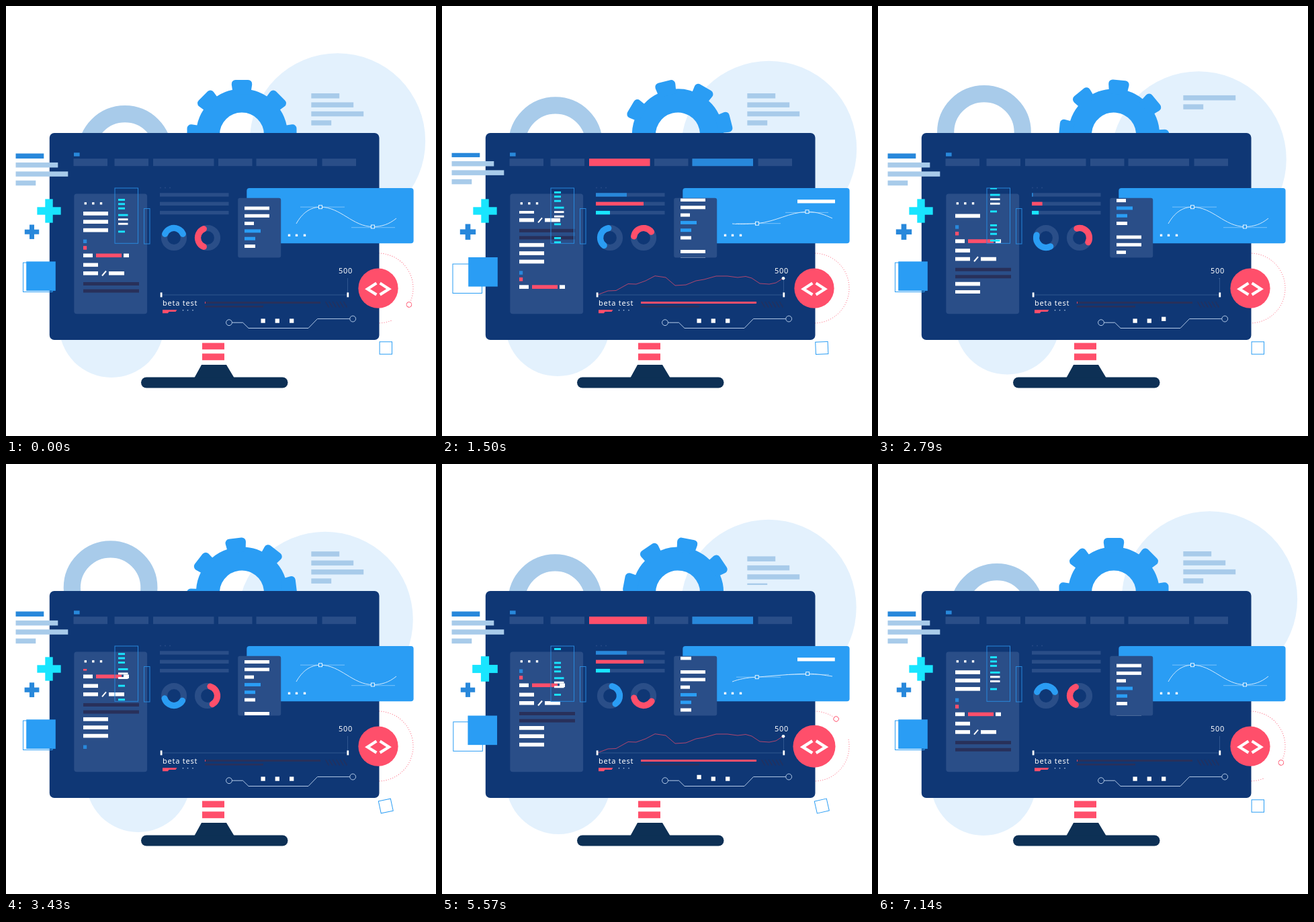
Write an HTML page with a canvas that moves like this. It is 640 px wide and 640 px high and loops after 7210 ms.

```html
<!DOCTYPE html>
<html lang="en">
<head>
<meta charset="utf-8">
<title>Dashboard</title>
<style>
  html, body { margin: 0; width: 100%; height: 100%; overflow: hidden; background: #fff; }
  canvas { display: block; width: 640px; height: 640px; }
</style>
</head>
<body>
<canvas id="stage"></canvas>
<script>
const LOOP = 7210, TICK = 71.4, TAU = Math.PI * 2;
const C = {
  white: '#fff', screen: '#0f3775', panel: '#2a4e88', stand: '#0d3055', red: '#ff4f6b',
  blue: '#2a9df4', mid: '#2888db', soft: '#a8cbea', pale: '#e3f1fd', cyan: '#19e5ff',
  dark: '#28305a', wire: '#b4cbe8'
};

const canvas = document.getElementById('stage');
const g = canvas.getContext('2d');
const ratio = window.devicePixelRatio || 1;
canvas.width = canvas.height = 640 * ratio;

// Timing helpers; time is counted in ticks, 100 per loop
const mod = (a, n) => ((a % n) + n) % n;
const ramp = (t, start, length) => {
  const u = Math.min(1, Math.max(0, (t - start) / length));
  return u * u * (3 - 2 * u);
};
const show = (t, inAt, inLen, outAt, outLen) => ramp(t, inAt, inLen) * (1 - ramp(t, outAt, outLen));
const hop = (t, start, length) => {
  const u = (t - start) / length;
  return u > 0 && u < 1 ? Math.sin(u * Math.PI) : 0;
};

// Drawing helpers
function rect(x, y, w, h, color) {
  g.fillStyle = color;
  g.fillRect(x, y, w, h);
}
function round(x, y, w, h, r, color) {
  g.fillStyle = color;
  g.beginPath();
  g.roundRect(x, y, w, h, r);
  g.fill();
}
function disc(x, y, r, color) {
  g.fillStyle = color;
  g.beginPath();
  g.arc(x, y, r, 0, TAU);
  g.fill();
}
function ring(x, y, r, width, color, from = 0, to = TAU) {
  g.strokeStyle = color;
  g.lineWidth = width;
  g.beginPath();
  g.arc(x, y, r, from, to);
  g.stroke();
}
function frame(x, y, w, h, color, width = 1) {
  g.strokeStyle = color;
  g.lineWidth = width;
  g.strokeRect(x, y, w, h);
}
function line(points, color, width) {
  g.strokeStyle = color;
  g.lineWidth = width;
  g.beginPath();
  points.forEach(([x, y]) => g.lineTo(x, y));
  g.stroke();
}
function shape(points, color) {
  g.fillStyle = color;
  g.beginPath();
  points.forEach(([x, y]) => g.lineTo(x, y));
  g.fill();
}
function dots(xs, y, size, color) {
  xs.forEach(x => rect(x - size / 2, y - size / 2, size, size, color));
}
function clipped(x, y, w, h, draw) {
  g.save();
  g.beginPath();
  g.rect(x, y, w, h);
  g.clip();
  draw();
  g.restore();
}
function at(x, y, scale, angle, draw) {
  g.save();
  g.translate(x, y);
  g.scale(scale, scale);
  g.rotate(angle);
  draw();
  g.restore();
}
function plus(x, y, size, thick, scale, color) {
  at(x, y, scale, 0, () => {
    rect(-size / 2, -thick / 2, size, thick, color);
    rect(-thick / 2, -size / 2, thick, size, color);
  });
}
function label(text, x, y) {
  g.font = '11px "Noto Sans", "Open Sans", sans-serif';
  g.letterSpacing = '0.75px';
  g.fillStyle = C.white;
  g.fillText(text, x, y);
}

// Endless vertical list: rows of [x, y, width, height, color]
function scroller(rows, box, period, offset) {
  const shift = mod(offset, period);
  clipped(...box, () => {
    for (const base of [shift - period, shift, shift + period]) {
      for (const [x, y, w, h, color] of rows) {
        if (color === 'slash') line([[x, y + base + h], [x + w, y + base]], C.white, 2);
        else rect(x, y + base, w, h, color);
      }
    }
  });
}

const codeRows = [
  [115, 306, 37, 5.7, C.white], [115, 318.3, 37, 5.7, C.white], [115, 330.8, 37, 5.7, C.white],
  [115, 347.5, 5.2, 5.5, C.mid], [115, 357.2, 5.2, 5.5, C.red],
  [115, 368.5, 14, 5.6, C.white], [134, 368.5, 38, 5.6, C.red], [175, 368.5, 8, 5.6, C.white],
  [115, 382.5, 22, 5.6, C.white],
  [115, 395, 22, 5.6, C.white], [143, 394.5, 6, 7, 'slash'], [153, 395, 23, 5.6, C.white],
  [115, 411, 83, 5, C.dark], [115, 421.6, 83, 5, C.dark]
];
const tagRows = [
  [287, 10, C.cyan], [293.3, 10, C.cyan], [299.8, 10, C.cyan], [309.7, 14.5, C.cyan],
  [316.2, 14.5, C.white], [322.8, 14.5, C.white], [334.4, 10, C.cyan]
].map(([y, w, color]) => [167, y, w, 2.9, color]);
const noteRows = [
  [37, C.white], [37, C.white], [14, C.white], [24, C.blue], [16, C.blue], [16, C.white]
].map(([w, color], i) => [355, 298.5 + i * 11.3, w, 5, color]);

const chart = [
  [231, 430], [247, 424], [259, 423.5], [277, 413.5], [289, 414], [303, 409], [317, 401.7],
  [333, 404], [347, 416], [363, 415], [378, 409], [390, 407], [408, 402], [425, 402],
  [440, 404], [452, 402.5], [461, 405], [473, 413], [487, 414], [497, 412], [508, 405]
];

// Text lines that leave upwards and come back from below, three times a loop
function textBars(x, y, first, k) {
  let shift = 0;
  if (k < 6) shift = -51 * (k / 6) ** 3;
  else if (k < 15) shift = 51 * (1 - (k - 6) / 9) ** 3;
  clipped(x, y - 0.7, 80, 50.7, () => {
    [42, 63, 78, 30].forEach((w, i) =>
      rect(x, y + i * 13.4 + shift, w, 7.5, i ? C.soft : first));
  });
}

function gear(angle) {
  at(351, 191.5, 1, angle, () => {
    ring(0, 0, 50.5, 35, C.blue);
    g.fillStyle = C.blue;
    for (let i = 0; i < 8; i++) {
      g.rotate(TAU / 8);
      g.beginPath();
      g.moveTo(-13, -60);
      g.arcTo(-16.3, -81.5, 0, -81.5, 6);
      g.arcTo(16.3, -81.5, 13, -60, 6);
      g.lineTo(13, -60);
      g.fill();
    }
  });
}

function background(f) {
  const drift = (1 - Math.cos(f / 100 * TAU)) / 2;
  const spin = f / 100 * TAU;
  disc(493.5 - 18.5 * drift, 201 + 30.5 * drift, 130.7, C.pale);
  disc(157 + 40 * drift, 475 - 5 * drift, 78, C.pale);
  ring(177 - 21.5 * drift, 218 - 34 * drift, 57.3, 25.2, C.soft);
  gear(spin);

  at(554, 420, 1, spin + 28 * Math.PI / 180, () => {
    g.setLineDash([1, 2.4]);
    ring(0, 0, 52, 0.9, C.red, 0.7, TAU);
    g.setLineDash([]);
    disc(52, 0, 3.8, C.white);
    ring(52, 0, 3.8, 0.9, C.red);
  });
}

function monitor() {
  rect(292, 501.5, 33, 9.7, C.red);
  rect(292, 517.3, 33, 9.9, C.red);
  shape([[291, 534], [328, 534], [340, 554], [280, 554]], C.stand);
  round(201, 552.5, 218.5, 16, 8, C.stand);
  round(64.8, 189, 490.7, 308, 7, C.screen);
}

function navigation(p) {
  rect(101, 218.3, 8.6, 5.4, C.mid);
  [[100.5, 50.5], [161.5, 50.5], [219, 90.5], [316, 50.5], [372.5, 90.5], [470.5, 50.5]]
    .forEach(([x, w]) => rect(x, 227.2, w, 11, C.panel));
  rect(219, 227.2, 90.5 * show(p, 2, 7.5, 27, 7.5), 11, C.red);
  rect(372.5, 227.2, 90.5 * show(p, 5, 7.5, 30, 7.5), 11, C.mid);
}

function meters(p, f) {
  dots([230, 237, 244], 270.5, 1.6, C.panel);
  [[46, C.mid], [71, C.red], [21, C.cyan]].forEach(([w, color], i) => {
    const y = 278.3 + i * 13.3;
    rect(229, y, 102.5, 5.4, C.panel);
    rect(229, y, w * show(p, 4.6 + 1.5 * i, 9, 32 + 1.5 * i, 8), 5.4, color);
  });

  const half = 67 * Math.PI / 180;
  [[250, -Math.PI / 2, -1, C.blue], [300, Math.PI, 1, C.red]].forEach(([x, start, way, color]) => {
    const middle = start + way * f / 100 * TAU;
    ring(x, 345, 14.5, 9.2, C.panel);
    g.lineCap = 'round';
    ring(x, 345, 14.5, 9.2, color, middle - half, middle + half);
    g.lineCap = 'butt';
  });
}

function curvePanel(p) {
  round(358.3, 271, 248.3, 82.2, 4, C.blue);
  dots([421.5, 432.5, 444.5], 341.3, 3.4, C.white);
  rect(529, 288.2, 56 * show(p, 3, 8, 27.7, 8), 5.3, C.white);

  const m = show(p, 2, 8, 25.3, 8);
  const x1 = 468 + m, y1 = 299.2 + 24.5 * m, x2 = 546 - 2.5 * m, y2 = 328.5 - 22.3 * m;
  line([[438, y1], [504, y1]], '#7cc3fa', 1);
  line([[514 - 3 * m, y2 + 1.2], [579 - 4 * m, y2 + 1.2]], '#7cc3fa', 1);
  g.strokeStyle = '#d4ebfd';
  g.lineWidth = 1;
  g.beginPath();
  g.moveTo(432, 324);
  g.bezierCurveTo(441, 308 + 17 * m, 453, y1 + m, x1, y1);
  g.bezierCurveTo(498, y1 - 3 * m, 516, y2 + m, x2, y2);
  g.bezierCurveTo(559, y2, 570, 325 - 14 * m, 581, 316);
  g.stroke();
  [[x1, y1], [x2, y2]].forEach(([x, y]) => {
    rect(x - 2.5, y - 2.5, 5, 5, C.blue);
    frame(x - 2.5, y - 2.5, 5, 5, C.white, 0.9);
  });
}

function panels(p, f) {
  const turns = f / 100.3;
  round(101.3, 279.5, 108.8, 178.7, 4, C.panel);
  dots([118.3, 129.8, 141.5], 293.8, 3.4, C.white);
  scroller(codeRows, [110, 305, 95, 123], 126, -turns * 3 * 126);

  frame(162, 271, 34.5, 82.3, C.mid);
  frame(205.5, 301.5, 8.5, 52.5, C.mid);
  scroller(tagRows, [163, 271, 33, 82.3], 68, turns * 4 * 68);

  curvePanel(p);
  round(345.2, 285.8, 64, 88.8, 3, C.panel);
  scroller(noteRows, [346, 286.5, 62, 88], 77, turns * 4 * 77);
}

function timeline(p, f) {
  label('500', 495, 398);
  line([[231, 430], [508.5, 430], [508.5, 405]], '#2f568f', 1);
  const left = 231 + 278 * ramp(p, 29, 8);
  const right = 231 + 278 * ramp(p, 1, 12);
  if (right > left) {
    clipped(left, 395, right - left, 40, () => line(chart, '#b0466f', 1));
  }
  disc(508, 405.3, 2.4 * show(p, 11.5, 4.5, 36, 4), C.white);
  rect(229.7, 426.4, 2.8, 7, C.white);
  rect(507.4, 426.4, 2.8, 7, C.white);

  label('beta test', 233, 446);
  shape([[233, 452.3], [254.5, 452.3], [252.5, 455], [242.5, 455], [241, 457.2], [233, 457.2]], C.red);
  dots([263.5, 270.5, 278], 452.8, 1.4, C.wire);

  rect(296, 440, 172, 3, C.dark);
  rect(296, 446, 87, 2.6, C.dark);
  rect(296, 440, 0.8 + 171.2 * show(p, 4, 9, 29, 8), 3, C.red);
  for (let i = 0; i < 6; i++) {
    const x = 475.5 + i * 5.4;
    line([[x, 440], [x + 5, 448.6]], C.dark, 1.2);
  }

  ring(332, 471.2, 4.4, 1, C.wire);
  ring(516.2, 465.6, 4.4, 1, C.wire);
  line([[336.4, 471.2], [352.5, 471.2], [361, 479.5], [450, 479.5], [463.5, 465.6], [511.8, 465.6]], C.wire, 1);
  const beat = mod(f, 25);
  [382.6, 403.8, 425.2].forEach((x, i) => {
    const lift = hop(beat, 1 + 2.6 * i, 10);
    dots([x], 468.6 - 4.5 * lift, 6.3, C.white);
  });
}

function floating(p, f) {
  const beat = mod(f, 25);
  textBars(14.3, 219.5, C.mid, mod(f - 19, 100 / 3));
  textBars(454.2, 130, C.soft, mod(f - 67.75, 100 / 3));

  const swell = 1 + 0.11 * hop(beat, 1, 10);
  plus(64, 305, 35.3, 11.4, swell, C.cyan);
  plus(38.5, 336.2, 21.4, 7, 1 + 0.15 * hop(beat, 11.5, 12), C.mid);

  const apart = show(p, 0, 12, 25.5, 14);
  frame(25.5 - 9.5 * apart, 382 + 2 * apart, 43.5, 43.5, C.blue);
  rect(30.2 + 9 * apart, 380.3 - 6.3 * apart, 43.6, 43.6, C.blue);

  const sway = hop(p, 20, 10.5) ** 2 + hop(p, 41.5, 8.5) ** 2;
  at(565.3, 509, 1, -28 * sway * Math.PI / 180, () => frame(-9.2, -9.2, 18.4, 18.4, C.blue));

  at(554, 420.2, swell, 0, () => {
    disc(0, 0, 29.6, C.red);
    for (const side of [-1, 1]) {
      line([[side * 2.6, -7.6], [side * 16, 1], [side * 2.6, 9.4]], C.white, 4.2);
    }
  });
}

function draw(now) {
  const f = Math.min(100, (now % LOOP) / TICK);
  const p = f % 50;
  g.setTransform(ratio, 0, 0, ratio, 0, 0);
  rect(0, 0, 640, 640, C.white);
  background(f);
  monitor();
  navigation(p);
  meters(p, f);
  panels(p, f);
  timeline(p, f);
  floating(p, f);
}

let start;
function loop(now) {
  start ??= now;
  draw(now - start);
  requestAnimationFrame(loop);
}
requestAnimationFrame(loop);
</script>
</body>
</html>
```
